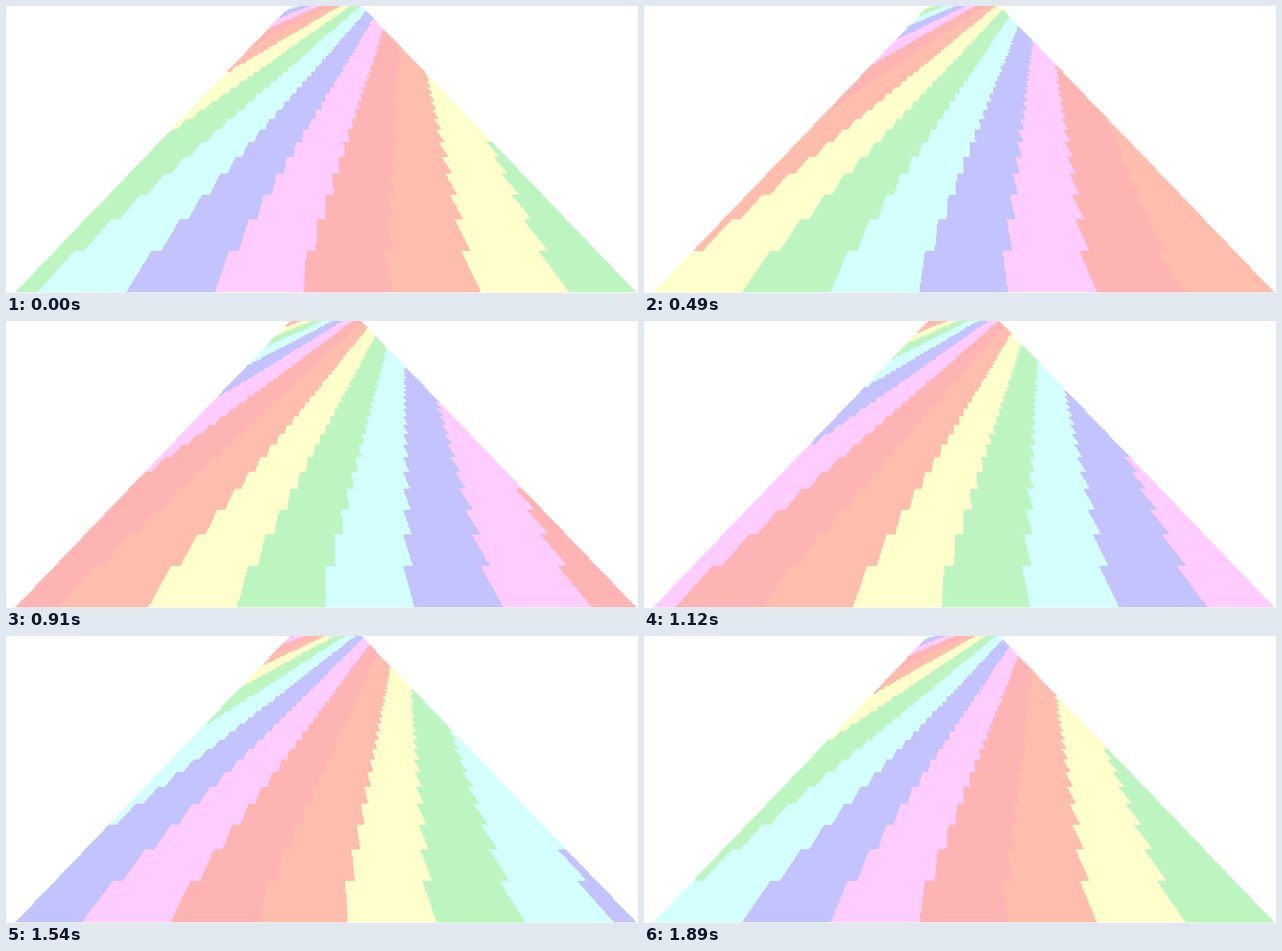
Recreate the animation shown at these times as an HTML page with a canvas. Size 898 by 409 pixels, loop 1.96 s.

```html
<!DOCTYPE html>
<html lang="en">
<head>
<meta charset="utf-8">
<title>Pastel road</title>
<style>
html, body { margin: 0; width: 100%; height: 100%; overflow: hidden; background: #fff; }
canvas { display: block; }
</style>
</head>
<body>
<canvas id="stage" width="898" height="409"></canvas>
<script>
const ctx = document.getElementById("stage").getContext("2d");
// cyan, blue, pink, red, orange, yellow, green
const colors = ["#d4ffff", "#c3c3ff", "#ffccff", "#ffb4b4", "#ffbdad", "#ffffcc", "#bdf5c1"];
const STEP = 70, STEPS = 28, BOTTOM = 408;
// The road is laid out on a coarse grid, in cells of 1.5 pixels.
const CELL = 1.5, LINES = 273;
const CENTER = 302.9, HORIZON = -35.3, SLOPE = 0.957;
const DEPTH = 2144, NEAR = 7;

const toPixel = cell => Math.floor(CELL * Math.ceil(cell) - 0.5);

// Each road row shifts the stripes by 1/8 stripe; each step by 1/4 stripe.
function draw(step) {
  ctx.clearRect(0, 0, 898, 409);
  for (let line = 0; line < LINES; line++) {
    const top = toPixel(line), bottom = Math.min(BOTTOM, toPixel(line + 1));
    const height = line - HORIZON;
    const row = Math.max(0, Math.floor(DEPTH / height - NEAR));
    const half = SLOPE * height;
    const left = CENTER - half, stripe = 2 * half / 7;
    const shift = (step + 1) / 4 + row / 8;
    const first = Math.floor(-shift);
    for (let k = first; k < first + 8; k++) {
      const from = toPixel(left + stripe * Math.max(0, k + shift));
      const to = toPixel(left + stripe * Math.min(7, k + 1 + shift));
      if (to <= from) continue;
      ctx.fillStyle = colors[(k % 7 + 7) % 7];
      ctx.fillRect(from, top, to - from, bottom - top);
    }
  }
}

let last = -1;
function tick() {
  const step = Math.floor(performance.now() / STEP) % STEPS;
  if (step !== last) draw(last = step);
  requestAnimationFrame(tick);
}
tick();
</script>
</body>
</html>
```
